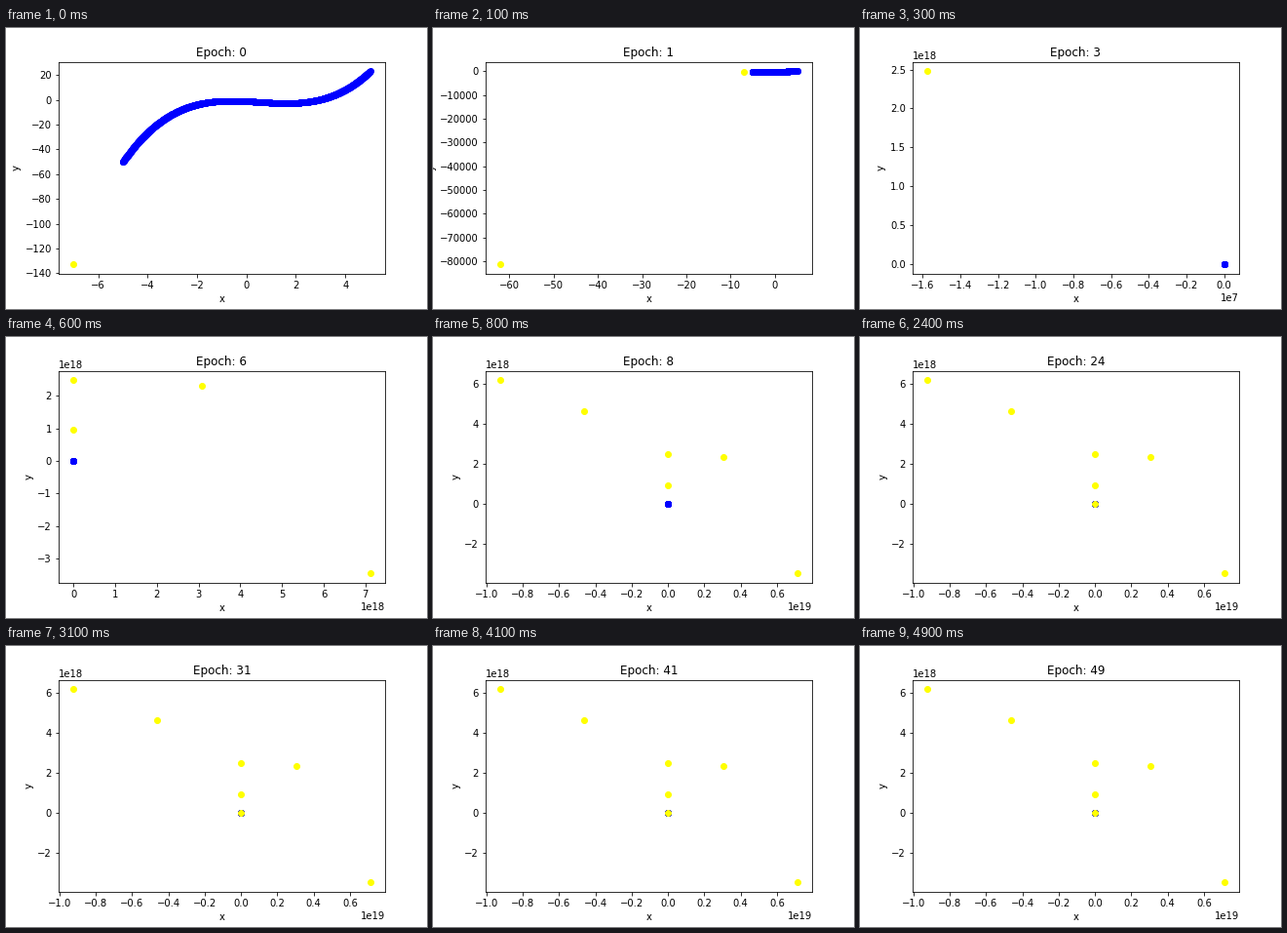
These frames come from a looping animation (432 px wide and 288 px high, 5000 ms). A matplotlib script:

```python
import numpy as np
import matplotlib.pyplot as plt
from matplotlib.animation import FuncAnimation

EPOCHS = 50
INTERVAL = 100


def wrap(n):
    """Reduce an integer to the signed 64-bit range, as overflow does."""
    return (n + 2**63) % 2**64 - 2**63


def curve(x):
    return x**3 / 3 - x**2 / 2 - x - 1


def wrapped_curve(x):
    return wrap(x**3) / 3 - wrap(x**2) / 2 - x - 1


def descend(x, steps):
    """Gradient descent with step size 1 in 64-bit integers."""
    path = [x]
    for _ in range(steps - 1):
        x = wrap(x - (x * x - x - 1))
        path.append(x)
    return path


path = descend(-7, EPOCHS)
path_x = np.array(path, dtype=float)
path_y = np.array([wrapped_curve(x) for x in path], dtype=float)
curve_x = np.linspace(-5, 5, 1000)
curve_y = curve(curve_x)

plt.rcParams["font.family"] = "DejaVu Sans"
fig, ax = plt.subplots(figsize=(6, 4), dpi=72)
fig.subplots_adjust(left=0.125, right=0.9, bottom=0.125, top=0.88)


def draw(epoch):
    ax.clear()
    # The curve covers earlier steps; only the newest lies above it.
    if epoch:
        ax.scatter(path_x[:epoch], path_y[:epoch], color="yellow")
    ax.scatter(curve_x, curve_y, color="blue")
    ax.scatter(path_x[epoch], path_y[epoch], color="yellow")
    ax.set_title(f"Epoch: {epoch}")
    ax.set_xlabel("x")
    ax.set_ylabel("y")
    return ax.collections


anim = FuncAnimation(fig, draw, frames=EPOCHS, init_func=lambda: draw(0),
                     interval=INTERVAL, repeat=True, repeat_delay=0)
plt.show()
```
